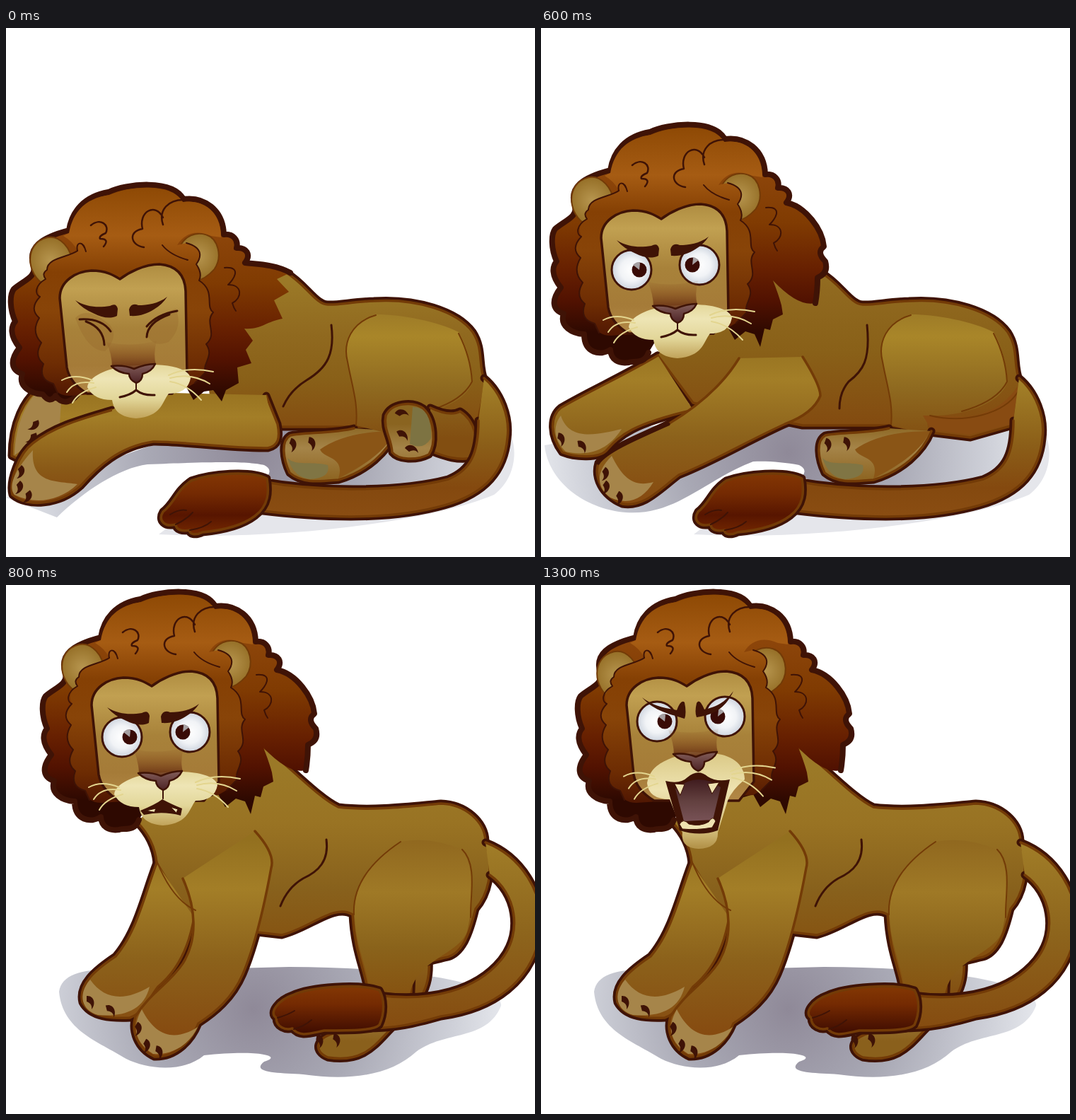
Animation, 748 px wide and 748 px high, one loop 1.5 s. Source, as an HTML page:

```html
<!DOCTYPE html>
<html lang="en">
<head>
<meta charset="utf-8">
<title>Lion waking up</title>
<style>
html, body { margin: 0; width: 100%; height: 100%; overflow: hidden; background: #fff }
svg { display: block; width: 100vw; height: 100vh }
path { stroke-linejoin: round; stroke-linecap: round }
</style>
</head>
<body>
<svg id="stage" viewBox="0 0 748 748"></svg>
<script>
const DARK = '#3f1306', EDGE = '#733b07', PAW = '#a6854a';

const fill = (d, color, extra = '') => `<path d="${d}" fill="${color}" ${extra}/>`;
const line = (d, width = 2, color = DARK) => fill(d, 'none', `stroke="${color}" stroke-width="${width}"`);
const move = (x, y, content) => `<g transform="translate(${x} ${y})">${content}</g>`;
// Open paths leave the joint with the body without an outline.
const edged = ([d, color]) => fill(d, color, `stroke="${EDGE}" stroke-width="3.5"`);
const limb = (d, color) => line(d, 11) + edged([d, color]);
// Outlines lie behind all parts, so limbs merge with the torso.
const figure = (...parts) => parts.map(([d]) => line(d, 11)).join('') + parts.map(edged).join('');
const claws = (...points) => points.map(([x, y, turn = 0]) =>
  `<g transform="translate(${x} ${y}) rotate(${turn})">${fill('M-5 -9C5 -10 9 2 2 10C3 4 0 1-5-1Z', DARK)}</g>`).join('');

const stops = list => list.map(([at, color, alpha = 1]) =>
  `<stop offset="${at}" stop-color="${color}" stop-opacity="${alpha}"/>`).join('');
const vertical = (id, y1, y2, ...list) =>
  `<linearGradient id="${id}" gradientUnits="userSpaceOnUse" x1="0" x2="0" y1="${y1}" y2="${y2}">${stops(list)}</linearGradient>`;
const radial = (id, x, y, r, ...list) =>
  `<radialGradient id="${id}" gradientUnits="userSpaceOnUse" cx="${x}" cy="${y}" r="${r}">${stops(list)}</radialGradient>`;

const skin = [[0, '#9b7927'], [.35, '#90691f'], [.65, '#896018'], [1, '#834b10']];
const arm = [[0, '#93701f'], [.25, '#a37e27'], [.6, '#8c621b'], [1, '#864a10']];
const defs = '<defs>' + [
  vertical('skinLie', 360, 570, ...skin),
  vertical('skinSit', 270, 560, ...skin),
  vertical('skinUp', 260, 520, [0, '#9b7927'], [.3, '#997323'], [.65, '#88611c'], [1, '#85500f']),
  vertical('haunch', 400, 580, [0, '#9c7a27'], [.2, '#a98629'], [.6, '#8f6a20'], [1, '#824e11']),
  vertical('haunchUp', 330, 590, [0, '#8a611c'], [.4, '#9f7926'], [.7, '#8a631b'], [1, '#85500f']),
  vertical('armLie', 510, 670, [0, '#96711f'], [.25, '#a37e27'], [.7, '#8a5a17'], [1, '#824710']),
  vertical('armLow', 440, 670, ...arm),
  vertical('armUp', 360, 640, ...arm),
  vertical('foot', 560, 645, [0, '#8a6420'], [.4, '#a58448'], [1, '#8a601c']),
  vertical('tail', 490, 690, [0, '#a5842a'], [.5, '#8b5e18'], [.8, '#84490f'], [1, '#8a4d12']),
  vertical('tailUp', 360, 630, [0, '#a17e28'], [.5, '#8d641c'], [1, '#854b10']),
  vertical('tuft', 628, 715, [0, '#843704'], [.35, '#742a02'], [.7, '#571500'], [1, '#742801']),
  vertical('tuftUp', 565, 635, [0, '#853904'], [.4, '#742a02'], [1, '#3d0b01']),
  vertical('mane', 0, 330, [0, '#874302'], [.25, '#8c450a'], [.45, '#803b02'], [.65, '#672001'], [.78, '#521201'], [.92, '#2e0901']),
  vertical('hair', 5, 310, [0, '#8b4703'], [.25, '#a65c13'], [.42, '#854004'], [.6, '#884408'], [.85, '#6d2c03'], [1, '#4f1602']),
  vertical('face', 125, 300, [0, '#b08e42'], [.18, '#c1a051'], [.5, '#a8823a'], [.8, '#a57b38'], [1, '#b18745']),
  vertical('bridge', 228, 272, [0, '#8a5525', 0], [.4, '#804619', .4], [1, '#5f2710', .95]),
  vertical('chin', 260, 340, [0, '#e2d596'], [.3, '#eee5b5'], [.65, '#e2d699'], [1, '#c1a35a']),
  vertical('chinLow', 235, 370, [0, '#d9c784'], [.4, '#eee3b0'], [.8, '#d8c483'], [1, '#b4944b']),
  vertical('throat', 265, 345, [0, '#351014'], [.5, '#62403f'], [1, '#80595f']),
  vertical('nose', 262, 290, [0, '#85605c'], [1, '#4c2225']),
  radial('shade', 350, 600, 380, [0, '#8f8998'], [.4, '#a9a9b5'], [.75, '#cfd1d9'], [1, '#eef0f4']),
  radial('eye', 0, 0, 29, [0, '#fff'], [.55, '#f1f3f6'], [1, '#cbd2dd']),
  radial('ear', 0, 0, 32, [0, '#b7964f'], [1, '#967028']),
].join('') + '</defs>';

/* ---------- lying and sitting ---------- */

const restShadow = front =>
  fill('M216 716C390 725 600 698 690 660C724 635 726 585 705 560L600 600L250 690Z', '#e5e6eb') +
  fill(front + 'C320 612 345 614 365 618Q377 624 370 633L400 655L640 645L690 570L400 520Z', 'url(#shade)');

const restTail =
  limb('M676 495C700 515 713 550 709 580C705 625 680 658 620 675C560 692 480 697 355 682L360 641C450 657 560 655 625 638C658 625 668 600 668 555', 'url(#tail)') +
  limb('M369 637C345 625 290 630 262 640C240 655 238 672 222 684C214 697 225 706 240 702C240 710 250 712 260 710C258 716 268 718 278 713C310 710 335 703 352 690C372 675 372 655 369 637Z', 'url(#tuft)') +
  line('M240 702Q255 695 264 685M260 710Q280 707 290 698M232 688Q245 680 255 682');

const haunch =
  fill('M523 405C560 405 610 415 640 430Q655 455 660 500C650 530 600 550 545 548L548 575L495 562C497 530 490 510 484 475C476 445 490 415 523 405Z', 'url(#haunch)') +
  line('M523 406C488 416 476 445 483 472C490 510 498 530 495 562M640 432Q657 465 659 500Q645 528 595 542', 2, EDGE);

const rumpShade =
  fill('M540 548L600 550Q650 545 675 505L667 560L605 575L552 568Z', '#884b12') +
  line('M550 548C600 560 655 545 674 515', 2, EDGE);

const hindFoot =
  limb('M492 566C465 573 420 572 402 576C388 584 392 610 401 629C420 645 445 641 470 639C510 627 540 600 552 570', 'url(#foot)') +
  fill('M398 608C410 620 430 612 455 618Q460 636 430 638Q407 636 398 608Z', '#807544') +
  fill('M470 637C480 605 450 610 444 596Q480 570 550 570Q535 605 470 637Z', '#8a5516') +
  claws([405, 590, 20], [432, 588, 10]);

const rump = 'C470 392 490 387 520 386C580 382 638 400 660 430C676 455 667 475 677 500C675 530 667 548 667 562';

const sleepBody = () =>
  restShadow('M0 664L72 692C110 655 160 622 200 617') +
  limb('M60 500C22 520 8 565 8 605Q25 615 50 610L110 560L300 525', 'url(#armLie)') +
  fill('M42 517C20 540 12 580 12 604L40 585L76 560L78 528Z', PAW) +
  claws([39, 562, 70], [36, 580, 70]) +
  limb('M270 345L395 345C425 363 438 391 455 391' + rump + 'L495 564L388 564L290 540', 'url(#skinLie)') +
  hindFoot + haunch +
  limb('M600 537Q628 550 642 542C664 555 668 585 664 607C640 613 620 606 600 598', 'url(#haunch)') +
  limb('M537 548C545 530 575 527 590 538C608 555 607 590 598 603C580 612 555 611 546 600C545 580 533 567 537 548Z', 'url(#foot)') +
  fill('M575 536Q602 535 601 580Q590 598 571 588Z', '#7d7342') +
  claws([560, 545, -60], [561, 576, -30], [574, 596, -50]) +
  line('M460 420C465 460 455 480 425 498Q402 512 392 535', 3) +
  limb('M368 520L384 560C388 580 385 591 370 594C320 595 240 584 208 585C160 592 130 620 105 648C75 675 30 678 9 660C4 640 18 602 38 587C70 562 110 552 150 540', 'url(#armLie)') +
  fill('M150 540L190 515L368 519L376 560L150 570Z', 'url(#armLie)') +
  fill('M38 597C8 630 4 650 12 660C40 674 75 670 101 645C70 640 35 645 38 597Z', PAW) +
  claws([20, 628, 40], [18, 650, 40], [30, 663, 50]) + restTail;

const lowBody = () =>
  restShadow('M5 590C10 640 60 680 120 685C190 690 230 640 300 613') +
  figure(
    ['M250 345L395 345C425 363 438 391 455 391' + rump + 'L607 579L550 572L495 562L370 562L215 530L165 463', 'url(#skinSit)'],
    ['M165 463C120 490 65 515 28 537C12 550 13 577 30 600C50 608 82 608 92 598C112 575 130 560 215 540', 'url(#armLow)'],
    ['M370 465Q395 505 395 520Q385 545 345 560C290 585 240 615 195 632C165 655 145 678 115 673C85 660 75 635 81 615C105 590 140 580 180 560C230 530 260 500 280 467', 'url(#armLow)']) +
  haunch + rumpShade + hindFoot +
  line('M461 420C466 470 455 485 435 500Q422 515 422 538', 3) +
  fill('M28 548C15 565 20 585 35 599C60 605 92 602 114 567C80 575 40 585 28 548Z', PAW) +
  claws([28, 582, 10], [58, 592, -10]) +
  line('M81 615C90 600 130 582 180 560', 5) +
  fill('M100 605C75 630 80 650 98 664C125 676 145 665 159 642C130 650 115 635 100 605Z', PAW) +
  claws([90, 631, 35], [91, 650, 35], [110, 665, 30]) + restTail;

const sitBody = () =>
  restShadow('M400 530L260 530C180 530 90 545 85 575C88 620 130 640 170 650C210 660 240 660 260 655L300 628V612') +
  limb('M470 530Q466 550 485 568L510 575L505 535', 'url(#foot)') +
  figure(
    ['M300 250L415 250C445 265 460 310 480 335C505 370 540 378 580 385C635 398 660 415 668 445C674 470 667 478 677 500L667 562L607 579L550 572L495 548Q470 510 440 510L370 508L285 465L228 380L225 330', 'url(#skinSit)'],
    ['M228 382C205 415 190 455 165 482C140 495 120 505 108 548C106 573 115 587 135 591C160 596 185 582 195 570Q205 535 220 520Q262 500 286 460', 'url(#armUp)'],
    ['M388 350Q408 390 403 405C390 460 380 510 360 545C340 580 315 600 285 612C262 625 250 655 215 652C190 640 183 615 190 590C210 560 240 550 262 528C290 500 290 450 279 405', 'url(#armUp)']) +
  haunch + rumpShade + hindFoot +
  line('M473 385C478 415 470 430 443 444Q420 455 408 478', 3) +
  fill('M115 545C105 575 120 586 140 589C175 588 200 555 193 521C178 570 145 545 115 545Z', PAW) +
  claws([125, 577, 0], [157, 576, -20]) +
  fill('M200 588C180 615 190 635 212 648C240 650 260 635 270 615C235 625 215 615 200 588Z', PAW) +
  claws([194, 604, 30], [201, 628, 30], [217, 643, 20]) + restTail;

/* ---------- standing ---------- */

const standBody = () =>
  fill('M75 575C80 545 120 540 200 545L400 540C550 540 705 560 700 595C680 645 620 630 580 660C545 692 490 702 420 692C385 690 345 690 365 674C395 665 350 657 280 665C250 690 200 685 170 670C130 645 80 630 75 575Z', 'url(#shade)') +
  limb('M598 530Q600 560 588 580L570 585L575 530', 'url(#haunch)') +
  limb('M520 585Q515 625 470 632C435 640 435 660 455 668C510 677 525 645 550 622L560 585', 'url(#foot)') +
  figure(
    ['M300 230L365 230C395 250 440 300 470 314C520 320 580 312 615 309C650 310 677 335 678 362C692 405 680 440 664 458C655 495 645 520 625 526C600 532 575 535 574 550L572 595L512 595C515 555 493 530 490 466C465 450 430 485 390 495L355 491L260 470L213 393Q210 360 185 335', 'url(#skinUp)'],
    ['M213 393C195 440 185 490 155 525C125 545 102 565 108 590C120 612 150 613 175 612C195 605 205 580 215 568Q255 535 266 470', 'url(#armUp)'],
    ['M352 348Q381 380 375 400C365 455 352 510 335 550C320 585 295 605 272 620C262 645 240 668 210 667C185 655 177 630 183 610C205 575 230 565 250 535C272 500 268 455 250 415', 'url(#armUp)']) +
  fill('M558 363C510 395 490 430 493 470C495 520 517 550 514 592L570 592C570 530 640 525 652 490C663 440 662 400 645 374Q600 355 558 363Z', 'url(#haunchUp)') +
  line('M558 363C510 395 490 430 492 466M645 374C667 395 656 440 657 470M213 390Q235 445 268 460', 2, EDGE) +
  line('M453 360C457 390 442 405 420 415Q398 428 388 454', 3) +
  fill('M119 558C100 580 108 602 130 608C165 611 195 602 203 568C170 588 140 588 119 558Z', PAW) +
  claws([119, 590, 0], [148, 602, -15]) +
  fill('M192 600C175 630 187 650 208 663C240 665 262 645 271 625C240 645 212 640 192 600Z', PAW) +
  claws([186, 628, 30], [198, 652, 30], [216, 661, 10]) +
  claws([443, 645, 10], [467, 644, 10]) +
  limb('M678 364C728 383 762 435 756 490C745 560 690 600 615 610C580 620 550 628 500 627L525 580C600 590 665 573 700 530C732 490 720 435 684 410', 'url(#tailUp)') +
  limb('M528 573C500 563 430 568 405 580C385 587 371 605 382 612C382 625 395 630 405 627C415 640 430 634 450 630C490 630 520 630 528 622C536 605 535 585 528 573Z', 'url(#tuftUp)') +
  line('M384 612Q398 608 408 602M407 628Q420 625 432 615');

/* ---------- head, in standing coordinates ---------- */

const maneTop = 'C80 305 62 295 68 277C52 272 50 258 64 240C50 222 52 210 58 203C50 185 50 165 56 157C70 145 88 140 84 125C75 98 95 84 134 74C138 48 155 26 190 20C215 8 280 1 296 30C325 26 352 45 353 80C366 78 374 88 371 99C385 98 392 108 383 120';
const manes = {
  lying: {
    chin: 'M150 300C140 318 125 322 115 308Q107 320 97 306',
    back: 'C400 122 425 122 447 134',
    tips: 'L428 143L445 161L424 173L436 199C413 203 405 215 382 213L394 230L384 243L392 262L372 268L374 290L356 300L350 316L338 300',
  },
  raised: {
    chin: 'M188 332C182 350 165 343 160 346C145 348 135 342 134 328C120 337 97 333 97 306',
    back: 'C410 125 434 158 436 182Q425 190 438 203Q443 220 427 226Q427 245 424 262',
    tips: 'Q400 268 364 230Q372 250 376 265L378 278L364 285L360 300L352 298L346 324L338 306',
  },
};

const mane = ({ chin, back, tips }) => {
  const rim = chin + maneTop + back;
  return fill(rim + tips + 'L325 302L310 314L300 296L270 305L200 312Z', 'url(#mane)') + line(rim, 8);
};

const ear = (x, y, tilt) => `<g transform="translate(${x} ${y}) rotate(${tilt})">` +
  fill('M-15 32C-38 12-32-32 2-33C20-33 34-10 28 10Q20 28 8 34Z', 'url(#ear)', `stroke="${EDGE}" stroke-width="2"`) + '</g>';

const hair =
  fill('M101 143Q95 135 103 130C103 112 135 112 146 103Q140 90 126 82L134 78C140 45 160 28 192 24C220 11 280 7 295 34C325 30 349 48 349 84L335 82C312 72 296 80 287 95L300 92C326 99 320 114 314 122Q323 135 318 145C342 160 326 182 338 190C325 205 345 220 328 235C340 252 322 262 327 275L312 290L300 297L135 308Q115 308 112 291Q90 285 98 263Q84 252 95 233Q80 218 92 198Q77 185 93 168Q86 152 101 143Z', 'url(#hair)') +
  line('M146 103C135 112 103 112 103 130Q95 135 101 143C85 152 86 165 93 168Q77 185 92 198Q80 218 95 233Q84 252 98 263Q90 285 112 291L118 304') +
  line('M146 103C143 90 154 88 158 104M266 95Q277 109 302 116M300 92C326 99 320 114 314 122Q323 135 318 145C342 160 326 182 338 190C325 205 345 220 328 235C340 252 322 262 327 275L312 290') +
  line('M165 67C178 56 192 66 186 78Q176 82 178 86Q192 86 183 97M240 98C220 95 218 75 238 72C232 48 256 34 267 56M267 66C260 45 275 30 298 31', 2.5) +
  line('M354 127C380 125 366 145 359 151C380 151 379 170 365 177Q367 184 370 188');

const faceShape = fill('M121 170C121 145 145 132 166 131C187 131 198 138 206 143C218 134 240 122 262 122C287 124 298 138 299 160L301 278L280 305L160 305Q135 290 131 268Z', 'url(#face)', `stroke="${DARK}" stroke-width="3.5"`);

const eyes = dy => [[164, 215, 11], [260, 208, -10]].map(([x, y, look]) => move(x, y + dy,
  `<circle r="28" fill="url(#eye)" stroke="${DARK}" stroke-width="3"/><circle cx="${look}" r="10.5" fill="#390b06"/>` +
  fill(`M${look} 0L${look - Math.sign(look) * 9}-7Q${look - 1}-14 ${look + 1}-9Z`, '#a6a0a2'))).join('');

const brows = fill('M143 173C160 184 178 183 192 181Q201 176 203 185L202 195C192 200 180 197 170 192Q153 185 143 173ZM273 168C260 178 245 180 232 180Q222 176 219 186L220 195C234 196 244 192 254 186Q266 179 273 168Z', DARK);
const fierceBrows = fill('M143 159C163 174 180 174 192 177Q198 161 203 166Q206 181 203 189C185 183 160 179 143 159ZM272 150C258 169 244 173 231 176Q224 159 220 167Q217 180 220 187C240 184 260 177 272 150Z', DARK);

const closedEyes =
  fill('M143 198Q160 180 192 208Q205 225 185 245Q160 245 143 198ZM246 225Q250 195 285 185Q296 210 275 232Q255 240 246 225Z', '#95672b', 'opacity=".35"') +
  line('M149 200Q180 198 193 217M158 203Q183 212 184 236M287 188Q258 193 244 210M276 193Q245 204 244 225', 3);

const whiskers = line('M160 286Q135 276 117 286M162 290Q135 285 124 303M165 296Q140 303 132 318M268 279Q295 266 331 274M270 283Q300 275 326 291M270 288Q295 292 314 314', 2, '#e3d58f');
const nose =
  fill('M180 232Q215 240 251 230Q246 250 250 264Q220 272 188 268Q188 250 180 232Z', 'url(#bridge)') +
  fill('M187 266Q205 264 219 270Q235 263 249 263Q244 274 231 277Q231 287 222 290Q212 285 212 277Q197 276 187 266Z', 'url(#nose)', `stroke="${DARK}" stroke-width="2.5"`);
const snout = 'M153 296C155 280 182 270 205 266L245 264C270 264 297 270 299 283Q295 305 268 305C258 318 258 337 222 340C195 338 190 325 188 314Q162 314 153 296Z';
const fangs = d => fill(d, '#eee2b1', `stroke="${DARK}" stroke-width="1"`);

const mouths = {
  closed: fill(snout, 'url(#chin)') + nose + line('M222 290V300') + line('M199 310Q214 307 222 300Q232 308 248 307', 3),
  ajar: fill(snout, 'url(#chin)') + nose + line('M222 290V302') +
    fill('M190 319Q212 310 221 303Q236 311 249 316L247 326Q222 319 195 325Z', DARK) +
    fangs('M198 319L212 316L210 321ZM233 314L243 317L241 322Z'),
  open: fill('M144 286C155 265 185 255 210 248L245 249C280 252 290 275 288 286Q270 300 262 310L251 345Q250 362 223 363Q200 363 198 340L182 308Q150 310 144 286Z', 'url(#chinLow)') +
    fill('M178 296Q195 299 207 290Q222 280 236 291Q248 297 263 293L248 340Q225 347 196 337Z', DARK) +
    fill('M190 303Q222 288 253 301L244 331L200 327Z', 'url(#throat)') +
    fangs('M188 299L202 300L197 315ZM236 300L250 298L243 315ZM197 321Q202 312 207 322Q223 328 236 320Q242 311 247 320L241 333Q218 337 200 331Z') + move(0, -15, nose),
  roar: fill('M150 280C155 250 185 245 210 236L245 238C278 242 288 260 288 275Q270 290 264 305L250 350Q251 372 223 373Q197 372 200 350L182 303Q152 303 150 280Z', 'url(#chinLow)') +
    fill('M176 277Q197 282 207 272Q222 259 236 271Q248 279 267 275L250 347Q225 356 196 347Z', DARK) +
    fill('M190 288Q222 263 254 286L243 332L202 334Z', 'url(#throat)') +
    fangs('M189 281L203 282L197 297ZM236 281L252 279L242 295ZM196 338Q201 329 209 338Q225 342 237 335Q243 325 247 334L242 343Q220 347 200 345Z') + move(0, -27, nose),
};

const head = ({ at, turn = 0, lying, asleep, mouth = 'closed', eyeLift = 0, earDrop = 0 }) => move(...at,
  mane(lying ? manes.lying : manes.raised) +
  move(0, earDrop, ear(108, 117, -12) + ear(316, 111, 18)) + hair + faceShape +
  (asleep ? closedEyes : eyes(eyeLift)) +
  (mouth === 'roar' ? fierceBrows : move(0, eyeLift * .7, brows)) +
  move(turn, 0, mouths[mouth] + move(0, eyeLift * .7, whiskers)));

const poses = [
  { body: sleepBody, at: [-45, 212], turn: 7, lying: true, asleep: true },
  { body: sleepBody, at: [-45, 212], turn: 7, lying: true },
  { body: lowBody, at: [-36, 127], turn: 7 },
  { body: sitBody, at: [30, 23] },
  { body: standBody, at: [0, 0], mouth: 'ajar' },
  { body: standBody, at: [0, 0], mouth: 'open', eyeLift: -13 },
  { body: standBody, at: [0, 0], mouth: 'roar', eyeLift: -22, earDrop: 10 },
];

const stage = document.getElementById('stage');
stage.innerHTML = defs + poses.map(p => `<g>${p.body()}${head(p)}</g>`).join('');
const layers = [...stage.children].slice(1);

function draw() {
  const t = performance.now() % 1500;
  const current = t < 500 ? 0 : Math.min(6, 1 + Math.floor((t - 500) / 100));
  layers.forEach((layer, i) => layer.style.display = i === current ? '' : 'none');
  requestAnimationFrame(draw);
}
draw();
</script>
</body>
</html>
```
